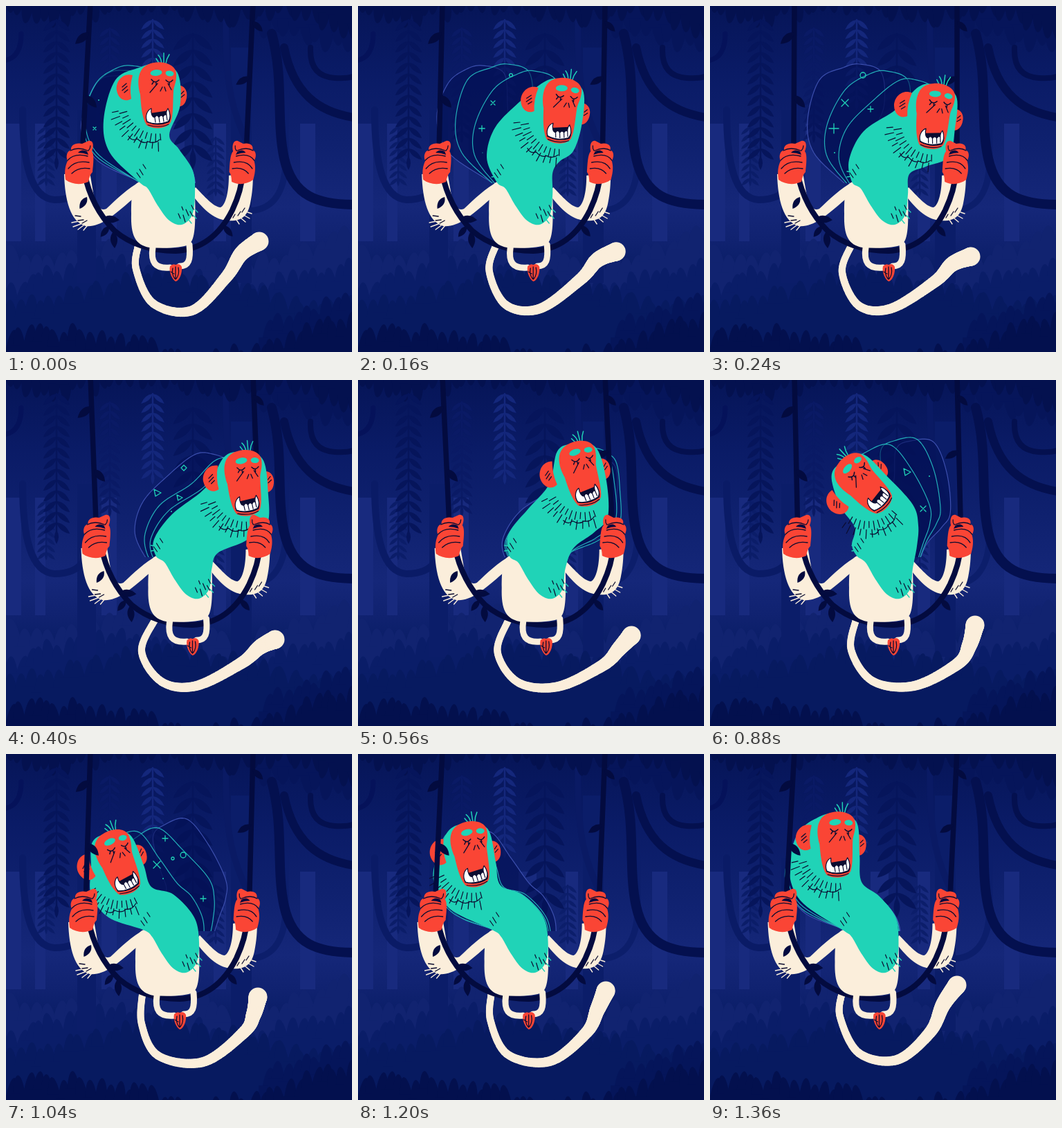
An HTML page with a canvas that plays this animation: 500x500 px, repeating every 1.44 s.

```html
<!DOCTYPE html>
<html lang="en">
<head>
<meta charset="utf-8">
<title>Swinging baboon</title>
<style>
  html, body { margin: 0; width: 100%; height: 100%; overflow: hidden; background: #061a60; }
  canvas { display: block; width: 500px; height: 500px; }
</style>
</head>
<body>
<canvas id="stage" width="500" height="500"></canvas>
<script>
const STEP = 80, STEPS = 18;
const RED = '#fa4535', TEAL = '#20d3b7', CREAM = '#fbeedb', INK = '#0b0c30', VINE = '#030b3f';
const ctx = document.getElementById('stage').getContext('2d');

// Pose keys, spaced unevenly over one loop of 18 steps
const KEYS = [0, 3, 5, 9, 11, 13, 17];
// swing, head x, head y, head angle
const pose = [
  [-13, 224.5, 136, 0], [0, 328, 167, 7], [11.5, 351, 155.5, -5], [13, 295, 132, -24],
  [7, 231, 152, -43], [-7, 170.5, 161.5, -20], [-13.5, 189, 138, -1]
];
// three points down the back, then three up the throat
const mane = [
  [158, 107, 141, 165, 150, 212, 270, 238, 250, 207, 236, 186],
  [268, 150, 222, 181, 201, 222, 288, 243, 312, 232, 345, 218],
  [289, 155, 240, 194, 214, 230, 306, 250, 345, 233, 377, 210],
  [250, 150, 242, 183, 217, 218, 312, 235, 327, 208, 333, 185],
  [188, 182, 209, 213, 205, 238, 299, 240, 301, 210, 293, 180],
  [123, 165, 123, 203, 148, 236, 272, 236, 242, 203, 210, 192],
  [130, 112, 114, 160, 130, 211, 268, 236, 245, 206, 219, 185]
];
// five points from the first bend to the tip
const tail = [
  [188, 380, 213, 430, 269, 440, 318, 392, 340, 358, 366, 340],
  [191, 385, 215, 433, 262, 437, 325, 398, 350, 373, 377, 362],
  [196, 392, 225, 436, 275, 442, 340, 409, 367, 386, 389, 375],
  [206, 392, 236, 437, 300, 443, 364, 413, 384, 387, 397, 360],
  [204, 390, 235, 435, 295, 442, 358, 410, 375, 383, 383, 354],
  [196, 390, 220, 436, 285, 445, 344, 402, 358, 376, 364, 351],
  [188, 380, 215, 432, 270, 442, 318, 402, 337, 362, 357, 334]
];
const sparks = [
  [0, 'x', 128, 177, 2], [0, '.', 134, 136, 1], [3, 'o', 221, 100, 4], [3, '+', 179, 177, 7],
  [3, 'x', 195, 140, 5], [3, '+', 232, 149, 4], [3, '.', 180, 212, 1], [5, 'd', 257, 127, 4],
  [5, 't', 219, 163, 5], [5, 't', 251, 170, 4], [5, '.', 239, 190, 1], [9, 'd', 346, 122, 5],
  [9, '.', 345, 167, 2], [11, 't', 285, 133, 5], [11, 'x', 308, 186, 4], [11, '.', 317, 139, 1],
  [13, 'x', 218, 160, 5], [13, '+', 230, 122, 4], [13, 'o', 256, 146, 4], [13, 'o', 241, 151, 2],
  [13, '+', 285, 209, 4], [13, '.', 227, 180, 1]
];

const keyTime = j => KEYS[(j + 7) % 7] + STEPS * Math.floor(j / 7);

// Periodic Hermite interpolation of every column
function at(rows, step) {
  const n = (step + STEPS) % STEPS;
  const i = KEYS.filter(k => k <= n).length - 1;
  const h = keyTime(i + 1) - keyTime(i), u = (n - keyTime(i)) / h;
  return rows[i].map((_, c) => {
    const v = j => rows[(j + 7) % 7][c];
    const slope = j => (v(j + 1) - v(j - 1)) / (keyTime(j + 1) - keyTime(j - 1)) * h;
    const e = u * u * (3 - 2 * u);
    return v(i) * (1 - e) + v(i + 1) * e
      + slope(i) * u * (1 - u) ** 2 - slope(i + 1) * u * u * (1 - u);
  });
}

const pairs = a => a.reduce((out, v, i) => (i % 2 ? out.at(-1).push(v) : out.push([v]), out), []);

// Points along a Catmull-Rom curve
function curve(pts, closed, per) {
  const n = pts.length, out = [];
  const p = i => closed ? pts[(i + n) % n] : pts[Math.max(0, Math.min(n - 1, i))];
  for (let i = 0; i < (closed ? n : n - 1); i++)
    for (let k = 0; k < per; k++) {
      const u = k / per;
      out.push([0, 1].map(c => {
        const [a, b, d, e] = [p(i - 1)[c], p(i)[c], p(i + 1)[c], p(i + 2)[c]];
        return b + u / 2 * (d - a + u * (2 * a - 5 * b + 4 * d - e + u * (3 * (b - d) + e - a)));
      }));
    }
  if (!closed) out.push(pts[n - 1]);
  return out;
}

function fill(g, color, d) {
  g.fillStyle = color;
  g.fill(typeof d === 'string' ? new Path2D(d) : d);
}
function line(g, color, width, d) {
  g.strokeStyle = color;
  g.lineWidth = width;
  g.lineCap = g.lineJoin = 'round';
  g.stroke(typeof d === 'string' ? new Path2D(d) : d);
}
function oval(g, color, x, y, rx, ry = rx, a = 0) {
  g.fillStyle = color;
  g.beginPath();
  g.ellipse(x, y, rx, ry, a, 0, 7);
  g.fill();
}
function leaf(g, color, x, y, deg, len, fat = .42) {
  g.save();
  g.translate(x, y);
  g.rotate(deg * Math.PI / 180);
  const w = len * fat;
  fill(g, color, `M0 0Q${len * .45} ${-w} ${len} 0Q${len * .45} ${w} 0 0`);
  g.restore();
}

function makeForest() {
  const c = document.createElement('canvas');
  c.width = c.height = 500;
  const g = c.getContext('2d');
  let seed = 11;
  const rnd = () => (seed = seed * 16807 % 2147483647) / 2147483647;
  const sky = g.createLinearGradient(0, 0, 0, 500);
  [[0, '#061558'], [.2, '#0a1b66'], [.4, '#0f216f'], [.58, '#152779'], [.68, '#102270'], [.8, '#071b62'], [1, '#061a60']]
    .forEach(s => sky.addColorStop(...s));
  g.fillStyle = sky;
  g.fillRect(0, 0, 500, 500);

  // Row of leaves along an edge; dir 1 grows from the floor, -1 hangs from the top
  const foliage = (color, edge, dir, gap = 13, from = 0, to = 500) => {
    for (let x = from - 6; x < to + 10; x += gap) {
      const y = edge(x) + rnd() * 16 * dir;
      oval(g, color, x, y + 42 * dir, gap * .72, 42, (rnd() - .5) * .3);
      g.fillRect(x - gap, dir > 0 ? y + 26 : -10, gap * 2, dir > 0 ? 500 : Math.max(0, y - 16));
    }
  };
  const fern = (x, top, bottom, len, color) => {
    line(g, color, 2.5, `M${x} ${top}V${bottom}`);
    for (let y = top; y < bottom - 6; y += len * .62)
      for (const a of [40, 140]) leaf(g, color, x, y, a, len, .3);
    leaf(g, color, x, bottom - 8, 90, len * .8, .3);
  };

  g.fillStyle = '#182a7e';
  [[0, 22], [42, 15], [138, 22], [232, 26], [300, 18], [425, 22]].forEach(([x, w]) => g.fillRect(x, 170, w, 170));
  foliage('#112370', x => 335 + 18 * Math.sin(x / 45), 1, 17);
  foliage('#0a1d68', x => 372 + 16 * Math.sin(x / 60 + 2), 1, 14);
  g.fillStyle = '#0b1d69';
  g.fillRect(103, 150, 27, 250);
  g.fillRect(325, 60, 30, 340);

  fern(212, 20, 142, 22, '#14277b');
  fern(150, 32, 190, 20, '#0a1a65');
  fern(303, 190, 270, 17, '#0c1e6b');
  fern(58, 175, 255, 17, '#0b1d69');
  line(g, '#0a1b66', 10, 'M24 150C24 225 35 278 70 280Q100 280 112 262');
  line(g, '#0c1e6b', 9, 'M345 296Q402 298 404 225V150');
  line(g, '#0a1a64', 9, 'M318 20C316 120 330 160 350 200');

  foliage('#071a60', x => 395 + 22 * Math.cos(x / 75), 1, 14);
  foliage('#06155a', x => 62 + 10 * Math.sin(x / 35), -1, 15, 380, 500);
  foliage('#04114f', x => 24 + 10 * Math.sin(x / 40) + Math.max(0, x - 380) * .32, -1, 13);
  fern(73, 20, 225, 25, '#06155b');
  fern(270, 40, 215, 37, '#06155b');
  line(g, '#04104f', 14, 'M384 40C402 105 390 165 402 220C414 275 450 288 510 287');
  line(g, '#04104f', 12, 'M402 60C415 125 450 155 510 162');
  line(g, '#04104f', 8, 'M440 60Q438 102 475 104T505 92');
  line(g, '#05125a', 7, 'M-4 79Q22 76 22 40');

  foliage('#05155a', x => 450 - Math.max(0, x - 370) * .35, 1, 14, 385, 500);
  foliage('#03104e', x => 472 - 16 * Math.cos((x - 75) / 72) - Math.max(0, x - 330) * .14, 1, 13);
  return c;
}
const forest = makeForest();

function onHead(step, draw) {
  const [, x, y, deg] = at(pose, step);
  ctx.save();
  ctx.translate(x, y);
  ctx.rotate(deg * Math.PI / 180);
  ctx.translate(-224.5, -136);
  draw(deg);
  ctx.restore();
}

function maneShape(step) {
  const [dx, hx, hy, deg] = at(pose, step);
  const a = deg * Math.PI / 180, cos = Math.cos(a), sin = Math.sin(a);
  const head = (x, y) => [hx + x * cos - y * sin, hy + x * sin + y * cos];
  const m = pairs(at(mane, step));
  const chest = [[205, 254], [218, 264], [232, 288], [249, 310], [267, 316], [282, 302], [286, 272]]
    .map(([x, y]) => [x + dx, y]);
  const pts = [head(-8, -52), head(-32, -47), ...m.slice(0, 3), ...chest, ...m.slice(3), head(27, 8), head(23, -40)];
  return new Path2D('M' + curve(pts, true, 10).map(p => p.join(' ')).join('L') + 'Z');
}

function drawTrail(step) {
  ctx.save();
  ctx.beginPath();
  ctx.rect(0, 0, 500, 256);
  ctx.clip();
  [3, 2, 1].forEach(lag => {
    const shape = maneShape(step - lag);
    fill(ctx, 'rgba(4,17,88,.6)', shape);
    line(ctx, lag > 2 ? '#3c4fae' : '#22aeb8', 1.2, shape);
  });
  ctx.restore();
  for (const [when, kind, x, y, r] of sparks) {
    const gap = Math.abs((step - when + 27) % STEPS - 9);
    if (gap > 1) continue;
    const s = gap ? r * .6 : r;
    if (kind === '.') { oval(ctx, TEAL, x, y, s); continue; }
    line(ctx, TEAL, 1.3, {
      o: `M${x - s} ${y}a${s} ${s} 0 1 0 ${2 * s} 0a${s} ${s} 0 1 0 ${-2 * s} 0`,
      '+': `M${x - s} ${y}h${2 * s}M${x} ${y - s}v${2 * s}`,
      x: `M${x - s} ${y - s}l${2 * s} ${2 * s}m0 ${-2 * s}l${-2 * s} ${2 * s}`,
      d: `M${x - s} ${y}l${s} ${-s}l${s} ${s}l${-s} ${s}Z`,
      t: `M${x - s} ${y - s}l${2 * s} ${s}l${-1.6 * s} ${s}Z`
    }[kind]);
  }
}

function drawTail(step, dx) {
  const pts = curve([[204 + dx, 346], ...pairs(at(tail, step))], false, 24);
  pts.forEach(([x, y], i) => oval(ctx, CREAM, x, y, 5 + 8.5 * (i / (pts.length - 1)) ** 2));
}

function drawFist() {
  fill(ctx, RED, 'M132 195C140 193 140 203 137 210C141 214 139 230 138 240C134 244 133 250 132 254C122 259 108 258 99 251C97 238 99 230 102 224C99 217 101 210 107 208C106 201 114 197 123 199Z');
  fill(ctx, VINE, 'M117 212Q122 206 130 210L132 215Q125 212 117 212');
  line(ctx, INK, 1.3, 'M106 209Q117 203 131 209M102 223Q112 212 131 217M103 235Q113 222 133 226M108 242Q118 232 134 235M132 209Q135 206 135 202');
}

function drawBody(dx) {
  ctx.save();
  ctx.translate(dx, 0);
  fill(ctx, CREAM, 'M335 245C335 270 330 288 323 291C312 290 300 275 287 262L280 270C296 292 312 308 332 310C352 312 362 305 366 285C369 270 370 258 370 240Z');
  fill(ctx, CREAM, 'M97 243C98 280 106 312 128 318C148 320 165 306 196 279L207 254C190 262 172 280 158 293C150 297 145 290 140 275L134 240Z');
  line(ctx, CREAM, 1.4, 'M118 311l-10 2M121 315l-11 4M125 317l-8 6M130 318l-5 6M358 303l7 4M353 307l6 5M346 309l4 6M362 298l6 2');
  line(ctx, INK, 1.3, 'M113 303l8 1M117 310l8 -1M123 314l7 -4M354 298l4 -6M348 303l4 -6M341 306l3 -5');
  line(ctx, VINE, 8, 'M126 240C132 270 145 300 170 325C195 346 225 354 258 354C300 352 325 325 340 295C348 278 354 260 355 240');
  [[130, 276, 122, 20], [152, 307, 5, 25], [162, 318, 128, 20], [168, 326, 85, 24], [327, 317, 50, 21]]
    .forEach(l => leaf(ctx, VINE, ...l));
  fill(ctx, CREAM, 'M207 254C195 256 194 275 194 300C193 332 200 345 220 349C245 351 268 349 277 345C287 338 287 315 286 270L250 262Z');
  line(ctx, CREAM, 9, 'M225 349C222 370 228 380 250 378M278 345C280 367 277 376 264 376');
  fill(ctx, RED, 'M250 376Q254 372 258 374Q264 371 267 377C268 385 264 397 258 398C253 395 248 384 250 376');
  line(ctx, INK, 1.3, 'M258 377V395M254 379Q252 388 257 394M262 378Q264 388 259 394M251 384l5 3');
  ctx.restore();
}

function drawEars(left) {
  onHead(0, () => {});
  if (left) {
    fill(ctx, RED, 'M183 100C168 96 158 110 160 122C162 134 172 140 181 134Q178 118 183 100');
    line(ctx, INK, 1.3, 'M168 117l6 -5M168 122l7 -6M171 125l5 -4');
  } else {
    fill(ctx, RED, 'M244 115C258 112 263 123 261 133C259 144 252 147 244 145Z');
    line(ctx, INK, 1.2, 'M253 127l4 -4M253 132l5 -4');
  }
}

function ear(step, left) {
  onHead(step, deg => {
    ctx.translate(224.5, 136);
    ctx.rotate(deg * .12 * Math.PI / 180);
    ctx.translate(-224.5, -136);
    drawEars(left);
  });
}

function drawFace() {
  line(ctx, TEAL, 1.5, 'M225 83Q224 75 220 71M228 82L228 68M231 83Q232 76 236 70M222 84l-5 -8');
  fill(ctx, RED, 'M213 82C226 79 245 84 246 97C247 108 243 115 242 122C241 140 242 158 238 168C232 178 212 179 203 172C196 160 195 142 194 128C189 110 189 86 213 82Z');
  oval(ctx, TEAL, 217, 96.5, 8.5, 4.5, -.1);
  oval(ctx, TEAL, 236.5, 97.5, 6, 4, .15);
  line(ctx, INK, 1.5, 'M210 106q5 7 11 1M231 107q5 6 10 0M213 110l-2 3M217 111v3M236 111v3');
  line(ctx, INK, 1.3, 'M219 112L208 125M234 112l5 9M226 117l-3 6M229 117l2 6');
  fill(ctx, INK, 'M203 168Q201 158 208 155L235 151Q240 160 236 168Q220 175 203 168');
  const teeth = 'M204 167C200 158 205 150 210 148C209 155 211 161 215 161Q218 156 221 161Q224 156 227 160Q230 155 232 158Q231 152 234 148C238 155 238 163 234 167C224 171 212 171 204 167Z';
  fill(ctx, '#fff', teeth);
  line(ctx, INK, 1.2, teeth + 'M215 161L216 168M221 161L222 168M227 160L228 167M232 158L233 165');
  line(ctx, INK, 1.2, 'M205 172Q222 177 235 171');
}

function drawBeard() {
  let d = '';
  for (let i = 0; i < 22; i++) {
    const row = i % 2, a = (168 - i * 4) * Math.PI / 180;
    const r = row ? 45 : 57, long = r + 9 + i % 3 * 2;
    d += `M${218 + Math.cos(a) * r} ${140 + Math.sin(a) * r}L${218 + Math.cos(a) * long} ${140 + Math.sin(a) * long}`;
  }
  line(ctx, INK, 1.2, d + 'M177 188Q182 196 190 192Q198 200 206 196Q214 200 222 193');
}

function drawChestFur(dx) {
  ctx.save();
  ctx.translate(dx, 0);
  line(ctx, TEAL, 1.4, 'M277 309l4 5M283 302l5 5M286 294l4 4M205 246l-7 1M204 240l-6 -1');
  line(ctx, INK, 1.2, 'M262 300l3 7M269 302l3 10M273 294l4 9M279 297l4 7M281 288l3 6M267 290l2 5M206 236l5 8M202 241l5 7M211 229l4 6');
  ctx.restore();
}

function drawRope(top, bottom, leaves) {
  line(ctx, VINE, 7.5, `M${top} -5L${bottom} 195v20`);
  for (const [y, deg, len] of leaves) leaf(ctx, VINE, top + (bottom - top) * y / 195, y, deg, len);
}

function draw(step) {
  const dx = at(pose, step)[0];
  ctx.drawImage(forest, 0, 0);
  drawTrail(step);
  drawTail(step, dx);
  drawRope(357, 357 + .7 * dx, [[22, 45, 21], [102, 150, 23]]);
  drawBody(dx);
  ear(step, false);
  fill(ctx, TEAL, maneShape(step));
  drawChestFur(dx);
  onHead(step, () => { drawBeard(); drawFace(); });
  ear(step, true);
  drawRope(122, 121 + .75 * dx, [[38, 140, 26], [129, 48, 24]]);

  ctx.save();
  ctx.translate(dx, 0);
  drawFist();
  // Mirrored and slightly leaning for the other hand
  ctx.transform(-.93, 0, -.15, 1, 500, 0);
  drawFist();
  ctx.restore();
}

function tick() {
  draw(Math.floor(performance.now() / STEP) % STEPS);
  requestAnimationFrame(tick);
}
tick();
</script>
</body>
</html>
```
